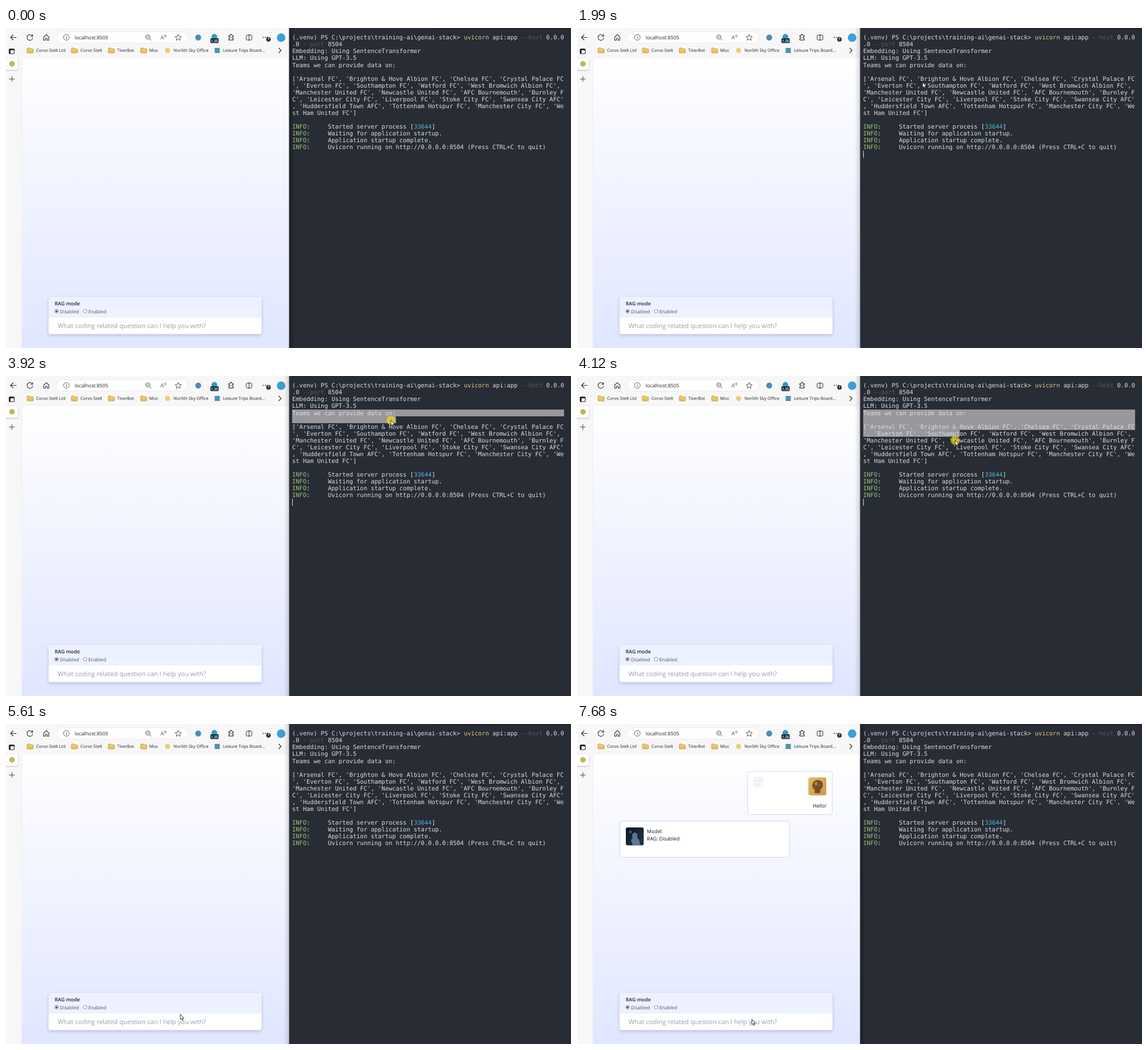
An HTML page with a canvas that plays this animation: 995x563 px, repeating every 8000 ms.

```html
<!DOCTYPE html>
<html lang="en">
<head>
<meta charset="utf-8">
<title>Chat demo</title>
<style>
html, body { margin: 0; width: 100%; height: 100%; overflow: hidden; background: #f7f7f7; }
canvas { display: block; width: 995px; height: 563px; }
</style>
</head>
<body>
<canvas id="stage"></canvas>
<script>
const W = 995, H = 563, LOOP = 8000;
const canvas = document.getElementById('stage');
const dpr = window.devicePixelRatio || 1;
canvas.width = Math.round(W * dpr);
canvas.height = Math.round(H * dpr);
const ctx = canvas.getContext('2d');
ctx.scale(dpr, dpr);
if ('textRendering' in ctx) ctx.textRendering = 'geometricPrecision';

const UI = '"Open Sans", "Noto Sans", sans-serif';
const MONO = '10.465px "DejaVu Sans Mono", monospace';
const CELL = 6.3, ROW = 12.08, TX = 504, TY = 10.5, COLS = 76;

// ---------- drawing helpers ----------
function text(s, x, y, size, color, weight = 400, align = 'left') {
  ctx.font = `${weight} ${size}px ${UI}`;
  ctx.textAlign = align;
  ctx.fillStyle = color;
  ctx.fillText(s, x, y);
}
function rect(x, y, w, h, color) {
  ctx.fillStyle = color;
  ctx.fillRect(x, y, w, h);
}
function round(x, y, w, h, r, fill, stroke, width = 1) {
  ctx.beginPath();
  ctx.roundRect(x, y, w, h, r);
  if (fill) { ctx.fillStyle = fill; ctx.fill(); }
  if (stroke) { ctx.strokeStyle = stroke; ctx.lineWidth = width; ctx.stroke(); }
}
function disc(x, y, r, fill, stroke, width = 1) {
  ctx.beginPath();
  ctx.arc(x, y, r, 0, Math.PI * 2);
  if (fill) { ctx.fillStyle = fill; ctx.fill(); }
  if (stroke) { ctx.strokeStyle = stroke; ctx.lineWidth = width; ctx.stroke(); }
}
function path(d, x, y, stroke, width = 1, fill) {
  const p = new Path2D(d);
  ctx.save();
  ctx.translate(x, y);
  ctx.lineCap = ctx.lineJoin = 'round';
  if (fill) { ctx.fillStyle = fill; ctx.fill(p); }
  if (stroke) { ctx.strokeStyle = stroke; ctx.lineWidth = width; ctx.stroke(p); }
  ctx.restore();
}
function fade(x0, y0, x1, y1, from, to) {
  const g = ctx.createLinearGradient(x0, y0, x1, y1);
  g.addColorStop(0, from);
  g.addColorStop(1, to);
  return g;
}

// ---------- timeline ----------
const TRACK = [
  [170, 921, 541], [300, 752, 396], [440, 677, 334], [1440, 677, 334],
  [1600, 668, 300], [1800, 632, 170], [1990, 609, 96], [2190, 560, 74],
  [2400, 505, 64], [2560, 505, 64], [2910, 629, 64], [3050, 676, 66],
  [3120, 682, 66], [3670, 682, 66], [3880, 682, 74], [3920, 678, 78],
  [4340, 653, 152], [4940, 653, 152], [5200, 480, 345], [5400, 350, 475],
  [5540, 307, 511], [5640, 307, 511], [5800, 308, 520]
];
const PRESSES = [[1440, 1600], [2460, 4740], [5700, 5840]];
const TERM_FOCUS = [1530, 5740];
const SELECT = [2560, 4940];
const KEYS = [6470, 6670, 6780, 6890, 7000, 7200];
const SENT = 7270, REPLY = 7340, PICTURES = 7610;
const within = (t, [a, b]) => t >= a && t < b;

function mouse(t) {
  if (t <= TRACK[0][0]) return TRACK[0].slice(1);
  for (let i = 1; i < TRACK.length; i++) {
    const [t1, x1, y1] = TRACK[i];
    if (t < t1) {
      const [t0, x0, y0] = TRACK[i - 1];
      const k = (t - t0) / (t1 - t0);
      return [x0 + (x1 - x0) * k, y0 + (y1 - y0) * k];
    }
  }
  return TRACK[TRACK.length - 1].slice(1);
}

// ---------- browser ----------
const INK = '#333';

function folder(x) {
  path('M0 1.5Q0 0 1.5 0H4L5.5 1.5H9.5Q11 1.5 11 3V7.5Q11 9 9.5 9H1.5Q0 9 0 7.5Z', x, 35, '#b98d2c', 0.7, '#e6c25c');
  rect(x + 0.8, 37.6, 9.4, 1, '#f5dc8d');
}

function toolbar() {
  rect(0, 0, 499, H, '#f7f7f7');
  path('M10 0H0M4.5 -4.5L0 0L4.5 4.5', 8, 16.5, INK, 1.2);
  path('M4.6 -2A5 5 0 1 0 5 1M4.8 -5V-1.8H1.6', 42, 16.5, INK, 1.1);
  path('M-4.5 -0.5L0 -4.8L4.5 -0.5V5H1.5V1.5H-1.5V5H-4.5Z', 71, 16.5, INK, 1.1);

  round(89, 6.5, 231, 20, 10, '#fff', '#ececec');
  disc(106.3, 16.5, 5, null, '#555', 0.9);
  path('M0 -0.5V2.5M0 -2.5V-2.4', 106.3, 16.5, '#555', 1);
  text('localhost:8505', 121, 19.9, 8.75, '#222');
  disc(249.8, 15.8, 3.7, null, '#555', 1);
  path('M0 0L3 3M-4.5 -2.7H-0.8', 252.6, 18.5, '#555', 1);
  text('A', 272, 20.2, 9.5, '#555');
  path('M0 0Q1 1.5 0 3M2 -1Q3.6 1.5 2 4', 279, 12.5, '#555', 0.8);

  ctx.beginPath();
  for (let i = 0; i < 10; i++) {
    const r = i % 2 ? 2.6 : 5.8, a = -Math.PI / 2 + i * Math.PI / 5;
    ctx.lineTo(303.3 + r * Math.cos(a), 17 + r * Math.sin(a));
  }
  ctx.closePath();
  ctx.strokeStyle = '#555';
  ctx.lineWidth = 1;
  ctx.stroke();

  disc(338.5, 16.8, 5.2, '#4d8cb8');
  disc(367, 15.5, 5, '#2f9bc4');
  round(360, 18, 14.5, 8.5, 1.5, '#17303f');
  text('1.35', 367.2, 24.8, 6.3, '#fff', 600, 'center');
  path('M-4 -3H-1.6A1.6 1.6 0 1 1 1.4 -3H4V-0.8A1.6 1.6 0 1 0 4 2V4.8H-4V2A1.6 1.6 0 1 0 -4 -0.8Z', 396.3, 16.3, INK, 1.1);
  round(423, 12.5, 10, 8.5, 1.5, null, INK, 1);
  path('M0 -5.5V5.5', 428, 16.8, INK, 1);
  for (let i = 0; i < 3; i++) disc(453 + i * 3.7, 16.5, 0.95, INK);
  disc(462.2, 20, 3.9, '#1d2b2b');
  text('?', 462.2, 22.4, 6.5, '#fff', 700, 'center');
  disc(484.5, 17, 7.5, '#3c9fd6');

  const marks = [[37, 53, 'Corvo Stelt Ltd'], [115, 131, 'Corvo Stelt'], [180, 196, 'TiverBot'], [237, 252, 'Misc']];
  for (const [fx, x, s] of marks) {
    folder(fx);
    text(s, x, 42.2, 7.6, '#222');
  }
  disc(284.5, 39.5, 4.5, '#e8cf72');
  text('Norlith Sky Office', 295, 42.2, 7.6, '#222');
  round(367.5, 35, 9, 9, 0, '#4c93b3');
  text('Leisure Trips Board...', 382, 42.2, 7.6, '#222');
  path('M0 -4L4 0L0 4', 480.5, 39.5, INK, 1.2);
}

function sidebar() {
  round(5.5, 36.8, 9, 8.5, 1.5, null, '#222', 1.1);
  rect(5.5, 37, 9, 2.2, '#222');
  rect(5.5, 37, 2.4, 8, '#222');
  ctx.save();
  ctx.shadowColor = 'rgba(0,0,0,.25)';
  ctx.shadowBlur = 3 * dpr;
  ctx.shadowOffsetY = dpr;
  round(-4, 53, 25, 20.5, 3, '#fff');
  ctx.restore();
  disc(10.5, 63, 4.8, '#bdb84a');
  path('M-4.5 0H4.5M0 -4.5V4.5', 10.3, 89.8, '#444', 1);
}

function panel(t, typed) {
  ctx.save();
  ctx.shadowColor = 'rgba(40,50,100,.22)';
  ctx.shadowBlur = 6 * dpr;
  ctx.shadowOffsetY = 2.5 * dpr;
  round(75, 473, 375, 65.5, 4, '#fff');
  ctx.restore();
  round(75, 473, 375, 36.5, [4, 4, 0, 0], '#eef1ff');
  text('RAG mode', 85.7, 488.4, 8.8, '#1f2430', 600);
  disc(89, 498.3, 3.2, '#fff', '#666', 0.8);
  disc(89, 498.3, 1.9, '#555');
  text('Disabled', 95, 501.5, 8.3, '#4b5563');
  disc(139.4, 498.3, 3.2, '#fff', '#777', 0.8);
  text('Enabled', 145, 501.5, 8.3, '#4b5563');

  if (typed) text(typed, 91, 528.2, 11.3, '#1f2937');
  else text('What coding related question can I help you with?', 91, 528.2, 11.3, '#989da9');

  if (within(t, [5800, 6330]) || within(t, [KEYS[0], SENT])) {
    const x = 91 + (typed ? ctx.measureText(typed).width : 0);
    rect(Math.round(x), 516, 1, 16, '#222');
  }
}

function userAvatar() {
  round(407.5, 94, 31.5, 31.5, 3, fade(407, 94, 439, 125, '#e0bb68', '#c99a45'));
  path('M-5 12V6Q-10 3 -9 -3Q-7 -11 1 -11Q10 -10 9.5 -2Q9 3 5 6V12Z', 423.5, 109.5, null, 0, '#7a4a2c');
  disc(421, 105, 3, '#b9813f');
  disc(427, 108, 2.4, '#4d7268');
  disc(419, 111, 2, '#a64c32');
}

function botAvatar() {
  round(86, 182, 31.5, 31.5, 3, fade(86, 182, 117, 213, '#0c1424', '#26354f'));
  path('M-6 13Q-8 4 -3 1Q-6 -8 1 -9Q7 -8 5 0Q10 4 10 13Z', 101, 200, null, 0, '#5a7795');
  path('M-12 13Q-12 5 -6 4L-3 13Z', 101, 200, null, 0, '#16243a');
  disc(94, 190, 2.5, '#34567f');
}

function messages(t) {
  if (t < SENT) return;
  round(300.5, 83.5, 149, 76, 4, '#fff', '#cdd5f8');
  round(311.5, 94.5, 15, 15, 2, null, '#ced5f8');
  path('M-0.5 -3H-4V4H3V0.5M1 -4H4V-1M4 -4L-1 1', 319, 102, '#c5cdf5', 1);
  text('Hello!', 439, 146.6, 8.9, '#111827', 400, 'right');
  if (t >= REPLY) {
    round(75.5, 171, 299, 63.5, 4, '#fff', '#cdd5f8');
    text('Model:', 123, 192.2, 8.8, '#111827');
    text('RAG: Disabled', 123, 205.3, 8.8, '#111827');
  }
  if (t >= PICTURES) {
    userAvatar();
    botAvatar();
  }
}

function page(t) {
  round(28, 52, 470, 520, [5, 0, 0, 0], fade(0, 52, 0, H, '#ffffff', '#e0e6ff'), '#ebebef', 0.8);
  messages(t);
  const count = t < SENT ? KEYS.filter(k => t >= k).length : 0;
  panel(t, 'Hello!'.slice(0, count));
}

// ---------- terminal ----------
const FG = '#dcdfe4', DIM = '#555b66', YEL = '#e5c98b', GRN = '#98c379', CYAN = '#52b8dc';
const info = s => [['INFO', GRN], [':     ' + s, FG]];
const LINES = [
  [['(.venv) PS C:\\projects\\training-ai\\genai-stack> ', FG], ['uvicorn', YEL], [' api:app ', FG], ['--host', DIM], [' 0.0.0', FG]],
  [['.0 ', FG], ['--port', DIM], [' 8504', FG]],
  'Embedding: Using SentenceTransformer',
  'LLM: Using GPT-3.5',
  'Teams we can provide data on:',
  '',
  "['Arsenal FC', 'Brighton & Hove Albion FC', 'Chelsea FC', 'Crystal Palace FC",
  "', 'Everton FC', 'Southampton FC', 'Watford FC', 'West Bromwich Albion FC', ",
  "'Manchester United FC', 'Newcastle United FC', 'AFC Bournemouth', 'Burnley F",
  "C', 'Leicester City FC', 'Liverpool FC', 'Stoke City FC', 'Swansea City AFC'",
  ", 'Huddersfield Town AFC', 'Tottenham Hotspur FC', 'Manchester City FC', 'We",
  "st Ham United FC']",
  '',
  [...info('Started server process ['), ['33644', CYAN], [']', FG]],
  info('Waiting for application startup.'),
  info('Application startup complete.'),
  info('Uvicorn running on http://0.0.0.0:8504 (Press CTRL+C to quit)')
];

function selection(t) {
  if (!within(t, SELECT)) return;
  const [x, y] = mouse(t - 40);
  const last = Math.max(4, Math.floor((y - TY) / ROW));
  const cols = Math.floor((x - TX) / CELL) + 1;
  for (let r = 4; r <= last; r++) {
    const top = Math.round(TY + r * ROW), bottom = Math.round(TY + (r + 1) * ROW);
    rect(TX, top, (r < last ? COLS : cols) * CELL, bottom - top, '#98979b');
  }
}

function terminal(t) {
  rect(498.5, 0, 497, H, '#282c34');
  rect(755, 0, 240, 3, '#23272d');
  selection(t);
  ctx.font = MONO;
  ctx.textAlign = 'left';
  LINES.forEach((line, r) => {
    let col = 0;
    for (const [s, color] of typeof line === 'string' ? [[line, FG]] : line) {
      ctx.fillStyle = color;
      ctx.fillText(s, TX + col * CELL, TY + r * ROW + 9.7);
      col += s.length;
    }
  });
  const focused = within(t, TERM_FOCUS);
  if (focused && Math.floor((t - TERM_FOCUS[0]) / 535) % 2 === 0) rect(TX, 216, 1, 12, FG);

  // the active window casts its shadow on the other one
  if (focused) rect(489, 0, 9.5, H, fade(489, 0, 498.5, 0, 'rgba(0,0,0,0)', 'rgba(0,0,0,.14)'));
  else rect(498.5, 0, 10.5, H, fade(498.5, 0, 509, 0, 'rgba(0,0,0,.28)', 'rgba(0,0,0,0)'));
}

function pointer(t) {
  if (t < TRACK[0][0]) return;
  const [x, y] = mouse(t);
  if (PRESSES.some(p => within(t, p))) disc(x, y, 8, 'rgba(248,223,10,.65)');
  path('M0 0V9L2 7.2L3.5 10.4L4.9 9.8L3.5 6.7H6.2Z', x, y, '#222', 0.9, '#fff');
}

function draw(t) {
  toolbar();
  sidebar();
  page(t);
  terminal(t);
  pointer(t);
}

const start = performance.now();
function tick() {
  draw((performance.now() - start) % LOOP);
  requestAnimationFrame(tick);
}
tick();
</script>
</body>
</html>
```
